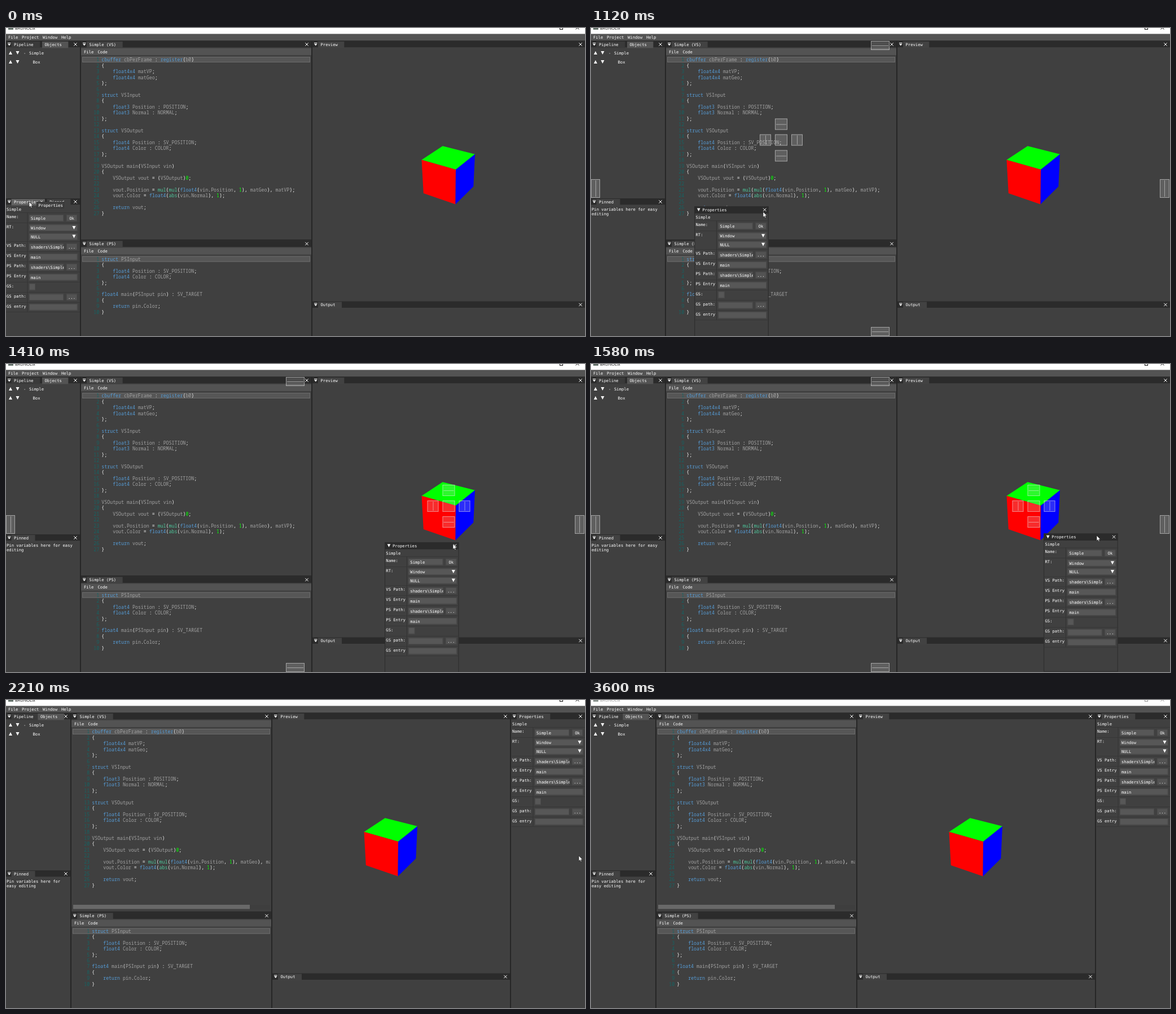
These frames come from a looping animation (1026x546 px, 3.66 s). An HTML page with a canvas:

```html
<!DOCTYPE html>
<html lang="en">
<head>
<meta charset="utf-8">
<title>Shader editor docking</title>
<style>
html, body { margin: 0; width: 100%; height: 100%; overflow: hidden; background: #404040; }
canvas { display: block; }
</style>
</head>
<body>
<canvas id="stage" width="1026" height="546"></canvas>
<script>
const W = 1026, H = 546, LOOP = 3660, STEP = 40;
const ctx = document.getElementById('stage').getContext('2d');
const UI = '7.2px "DejaVu Sans Mono", monospace';
const CODE = '8.28px "Noto Sans Mono", monospace';
const UI_STEP = 4.335, CODE_STEP = 4.97, LINE = 10.48;
const BG = '#404040', STRIP = '#2b2b2b', MENU = '#535353', TAB = '#545454', FIELD = '#575757';

const VS = `cbuffer cbPerFrame : register(b0)
{
    float4x4 matVP;
    float4x4 matGeo;
};

struct VSInput
{
    float3 Position : POSITION;
    float3 Normal : NORMAL;
};

struct VSOutput
{
    float4 Position : SV_POSITION;
    float4 Color : COLOR;
};

VSOutput main(VSInput vin)
{
    VSOutput vout = (VSOutput)0;

    vout.Position = mul(mul(float4(vin.Position, 1), matGeo), matVP);
    vout.Color = float4(abs(vin.Normal), 1);

    return vout;
}`.split('\n');

const PS = `struct PSInput
{
    float4 Position : SV_POSITION;
    float4 Color : COLOR;
};

float4 main(PSInput pin) : SV_TARGET
{
    return pin.Color;
}`.split('\n');

// Motion paths: [time, x, y]
const CURSOR = [
  [0, 41, 308], [420, 41, 308], [900, 106, 318], [950, 131, 325], [980, 150, 326],
  [1270, 524.5, 325.5], [1410, 792, 319], [1470, 845, 315], [1530, 880, 308],
  [1850, 1008.5, 276], [1910, 1015, 276], [2210, 1015, 276], [2600, 991, 455], [3140, 972, 548]
];
const FLOAT = [
  [980, 50, 315], [1270, 372, 318], [1410, 671, 316], [1470, 743, 313],
  [1530, 785, 305], [1850, 922.5, 269], [1910, 929, 269]
];

function at(path, t) {
  let i = 1;
  while (i < path.length - 1 && t >= path[i][0]) i++;
  const a = path[i - 1], b = path[i];
  const held = Math.floor((t - a[0]) / STEP) * STEP;
  const k = t >= b[0] ? 1 : Math.max(0, held / (b[0] - a[0]));
  return [a[1] + (b[1] - a[1]) * k, a[2] + (b[2] - a[2]) * k];
}

function rect(x, y, w, h, fill, line) {
  ctx.fillStyle = fill;
  ctx.fillRect(x, y, w, h);
  if (line) {
    ctx.strokeStyle = line;
    ctx.lineWidth = 1;
    ctx.strokeRect(x + .5, y + .5, w - 1, h - 1);
  }
}

function poly(points, fill) {
  ctx.beginPath();
  points.forEach(p => ctx.lineTo(p[0], p[1]));
  ctx.closePath();
  ctx.fillStyle = fill;
  ctx.fill();
}

function clipped(x, y, w, h, draw) {
  ctx.save();
  ctx.beginPath();
  ctx.rect(x, y, w, h);
  ctx.clip();
  draw();
  ctx.restore();
}

// y is the middle of the capitals
function label(s, x, y, color = '#fff') {
  ctx.font = UI;
  ctx.fillStyle = color;
  ctx.fillText(s, x, y + 2.6);
}

function down(x, y, r = 3) {
  poly([[x - r, y - r], [x + r, y - r], [x, y + r]], '#fff');
}

function up(x, y) {
  poly([[x - 3, y + 3], [x + 3, y + 3], [x, y - 3]], '#fff');
}

function cross(x, y, r = 2.7) {
  ctx.strokeStyle = '#fff';
  ctx.lineWidth = 1;
  ctx.beginPath();
  ctx.moveTo(x - r, y - r); ctx.lineTo(x + r, y + r);
  ctx.moveTo(x + r, y - r); ctx.lineTo(x - r, y + r);
  ctx.stroke();
}

// tabs: [text, text x, fill]
function header(x, y, w, tabs, close = true) {
  rect(x, y - 6, w, 11.5, STRIP);
  rect(x, y + 5.5, w, 1, '#424242');
  rect(x + 3, y - 3, 5.5, 1, '#fff');
  poly([[x + 3, y - 1], [x + 8.5, y - 1], [x + 5.75, y + 2.5]], '#fff');
  for (const [s, tx, fill] of tabs) {
    rect(tx - 4.5, y - 5, s.length * UI_STEP + 16, 11.5, fill);
    label(s, tx, y);
  }
  if (close) cross(x + w - 8, y);
}

const BLUE = /^(cbuffer|register|struct|return|float\dx?\d?)$/;
function tokenColor(s) {
  if (BLUE.test(s)) return '#569cd6';
  if (s === 'mul' || s === 'abs') return '#4dc69b';
  if (/^\d/.test(s)) return '#00ff00';
  return /^\w/.test(s) ? '#a2a2a2' : '#f4f4f4';
}

function editor(x, y, w, title, lines, bottom) {
  rect(x, y - 6, w, bottom - y + 6, BG);
  header(x, y, w, [[title, x + 14.5, '#424242']]);
  rect(x, y + 7, w, 12, MENU);
  label('File', x + 5, y + 13);
  label('Code', x + 29.5, y + 13);
  rect(x + 2, y + 22, w - 4, 10, '#565656', '#6c6c6c');
  clipped(x, y + 20, w - 2, bottom - y - 20, () => {
    ctx.font = CODE;
    lines.forEach((line, i) => {
      const base = y + 30.1 + i * LINE, n = String(i + 1);
      ctx.fillStyle = '#146464';
      ctx.fillText(n, x + 32.3 - n.length * CODE_STEP, base);
      for (const m of line.matchAll(/\w+|[^\s\w]/g)) {
        ctx.fillStyle = tokenColor(m[0]);
        ctx.fillText(m[0], x + 36.3 + m.index * CODE_STEP, base);
      }
    });
  });
}

function field(x, y, w, s = '') {
  rect(x, y - 5.5, w, 11.5, FIELD, '#4b4b4b');
  clipped(x, y - 6, w + .5, 12, () => label(s, x + 3, y + .5));
}

function button(y, s) {
  rect(107, y - 5.5, 19, 11.5, '#535353', '#4a4a4a');
  label(s, 116.5 - s.length * UI_STEP / 2, y + .5);
}

function combo(y, s) {
  field(41, y, 85.5, s);
  down(120.5, y, 3);
}

// Laid out around a header whose middle is at y = 0
function properties(x, y) {
  ctx.save();
  ctx.translate(x, y);
  label('Simple', 1, 13);
  for (const v of [19, 37, 70, 88, 106, 124, 142, 160, 178, 195]) rect(0, v, 131, 1, '#373737');
  rect(37.5, 19, 1, 176, '#343434');
  const names = ['VS Path:', 'VS Entry', 'PS Path:', 'PS Entry', 'GS:', 'GS path:', 'GS entry'];
  label('Name:', 1, 26);
  label('RT:', 1, 44);
  names.forEach((s, i) => label(s, 1, 77 + i * 18));
  field(41, 28.5, 61, 'Simple');
  button(28.5, 'Ok');
  combo(46, 'Window');
  combo(61.5, 'NULL');
  for (const v of [79.5, 115.5]) {
    field(41, v, 61, 'shaders\\Simple');
    button(v, '...');
    field(41, v + 18, 85.5, 'main');
  }
  field(41, 150.5, 11);
  field(41, 169, 61);
  button(169, '...');
  field(41, 186.5, 85.5);
  ctx.restore();
}

function guide(x, y, w, h, split) {
  rect(x, y, w, h, 'rgba(217,217,217,.2)', 'rgba(235,235,235,.5)');
  ctx.fillStyle = 'rgba(235,235,235,.5)';
  if (split === 'v') ctx.fillRect(x + Math.floor(w / 2), y + 2, 1, h - 4);
  if (split === 'h') ctx.fillRect(x + 2, y + Math.floor(h / 2), w - 4, 1);
}

function outerGuides() {
  guide(496, 23, 33, 16, 'h');
  guide(496, 530, 33, 16, 'h');
  guide(0, 268, 16, 33, 'v');
  guide(1008, 268, 17, 33, 'v');
}

function innerGuides(x, y) {
  guide(x - 11, y - 10, 22, 20);
  guide(x - 11, y - 38, 22, 20, 'h');
  guide(x - 11, y + 18, 22, 20, 'h');
  guide(x - 38, y - 10, 20, 20, 'v');
  guide(x + 18, y - 10, 20, 20, 'v');
}

function cube(dx) {
  const p = (...v) => v.map(([x, y]) => [x + dx, y]);
  const mid = [797, 251], left = [736.5, 233.8], right = [831, 223.8], foot = [796.5, 312.5];
  poly(p([773.7, 209.3], right, mid, left), '#00ff00');
  poly(p(left, mid, foot, [739.8, 293]), '#ff0000');
  poly(p(mid, right, [828.3, 281], foot), '#0000ff');
}

function titleBar(active) {
  rect(0, 0, W, 10.7, '#fff');
  rect(4, 0, 9, 3, active ? '#66736c' : '#8d9691');
  const ink = active ? '#111' : '#999';
  ctx.font = '7.4px "Open Sans", "Noto Sans", sans-serif';
  ctx.fillStyle = ink;
  ctx.fillText('BRUNOLix', 16, 2.8);
  ctx.strokeStyle = ink;
  ctx.lineWidth = 1;
  ctx.strokeRect(981.5, -3.5, 5, 6);
  ctx.beginPath();
  ctx.moveTo(1012.5, -.5); ctx.lineTo(1009.5, 2.5);
  ctx.moveTo(1012.5, -.5); ctx.lineTo(1015.5, 2.5);
  ctx.stroke();
  rect(0, 10.7, W, 11.6, MENU);
  label('File', 4, 16);
  label('Project', 28, 16);
  label('Window', 65, 16);
  label('Help', 98, 16);
}

function leftPanels(t, w, docked) {
  rect(0, 23, w, H - 23, BG);
  header(0, 29, w, [['Pipeline', 14, '#3a3a3a'], ['Objects', docked ? 61 : 68.5, TAB]]);
  for (const y of [44, 60]) {
    up(8, y);
    down(20.5, y);
  }
  label('-', 31, 44);
  label('Simple', 41, 44);
  label('Box', 47.5, 60);

  if (t < 600) header(0, 308, w, [['Pinned', 77, BG], ['Properties', 14, '#626262']]);
  else if (t < 980) header(0, 308, w, [['Pinned', 14, BG], ['Properties', 59.5, '#5c5c5c']]);
  else header(0, 308, w, [['Pinned', 14, '#424242']]);

  if (t < 980) {
    if (t < 600) cross(63, 308, 2);
    properties(0, 308);
  } else {
    label('Pin variables here for' + (docked ? '' : ' easy'), 1, 321);
    label(docked ? 'easy editing' : 'editing', 1, 329);
  }
}

function floating(t) {
  const [x, y] = at(FLOAT, t);
  rect(x, y, 131.5, 245, BG, '#2c2c2c');
  rect(x, y, 131.5, 12.5, STRIP);
  down(x + 7.5, y + 6, 2.8);
  label('Properties', x + 14, y + 6);
  cross(x + 124.5, y + 6);
  properties(x + 1.3, y + 6);
  return [x, y];
}

function pointer(x, y) {
  ctx.save();
  ctx.translate(x, y);
  poly([[0, 0], [0, 9.6], [2.2, 7.6], [3.7, 10.8], [5.2, 10.1], [3.8, 7], [6.7, 7]], '#fff');
  ctx.strokeStyle = '#111';
  ctx.lineWidth = .6;
  ctx.stroke();
  ctx.restore();
}

function draw(t) {
  const docked = t >= 2090;
  const drag = t >= 980 && !docked;
  const [cx, cy] = at(CURSOR, t);
  const leftW = docked ? 114 : 131;
  const midX = leftW + 2, midEnd = docked ? 470 : 541;
  const viewX = midEnd + 2, viewEnd = docked ? 893 : W;

  rect(0, 0, W, H, '#262626');
  titleBar(t < 3600);
  leftPanels(t, leftW, docked);
  editor(midX, 29, midEnd - midX, 'Simple (VS)', VS, 375);
  editor(midX, 382.5, midEnd - midX, 'Simple (PS)', PS, H);
  if (docked) {
    rect(119, 363, 349, 7.5, '#3e3e3e');
    rect(119, 363, 313, 7.5, '#696969');
  }
  rect(viewX, 23, viewEnd - viewX, H - 23, BG);
  header(viewX, 29, viewEnd - viewX, [['Preview', viewX + 14.5, '#424242']]);
  header(viewX, 490.5, viewEnd - viewX, [['Output', viewX + 14.5, '#424242']]);
  cube(docked ? -102 : 0);

  if (docked) {
    rect(895, 23, 131, H - 23, BG);
    header(895, 29, 131, [['Properties', 909.5, '#424242']]);
    properties(896, 29);
  }

  if (drag) {
    outerGuides();
    if (cx < 542) innerGuides(337, 198.5);
    else innerGuides(784.5, 252);
    const [x, y] = floating(t);
    // Guides over the dragged window trail behind it while it moves fast
    const lag = t < 1400 ? 29 : 0;
    clipped(x, y, 131.5, 245, () => {
      ctx.translate(-lag, 0);
      outerGuides();
    });
    if (t >= 1910) rect(895, 22, 131, H - 22, 'rgba(217,217,217,.28)');
  }

  if (t < 220) {
    rect(54, 308, 49, 11.5, BG, '#333');
    label('Properties', 57.5, 314);
  }
  if (t < 3140) pointer(cx, cy);
}

const start = performance.now();
function tick() {
  draw((performance.now() - start) % LOOP);
  requestAnimationFrame(tick);
}
tick();
</script>
</body>
</html>
```
